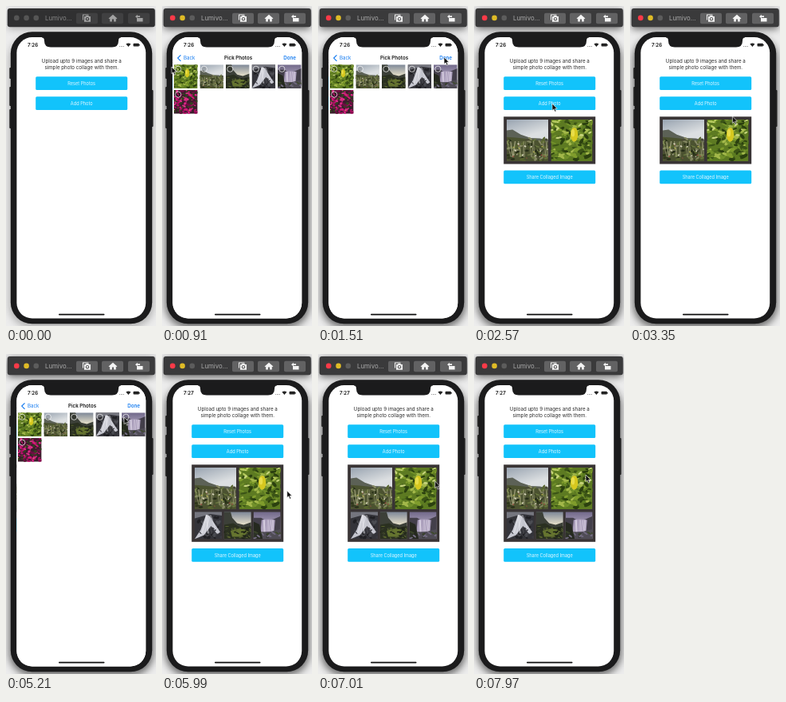
An HTML page for the animation above (8 s loop, 188x400 px).

```html
<!DOCTYPE html>
<html lang="en">
<head>
<meta charset="utf-8">
<title>Photo collage demo</title>
<style>
html, body { margin: 0; width: 100%; height: 100%; overflow: hidden; background: #ececec; }
svg#stage { display: block; width: 100vw; height: 100vh; }
text { font-family: Inter, "Liberation Sans", sans-serif; }
.mid { text-anchor: middle; }
.copy { font-size: 6.2px; fill: #2a2a2a; }
.label { font-size: 5.6px; fill: #e6f8ff; text-anchor: middle; }
.nav { font-size: 6.2px; fill: #147bf0; }
.bold { font-weight: 600; }
.lights circle { fill: #555; }
.key { fill: #404041; }
.icon { fill: #a2a2a2; }
.name { font-size: 7.8px; fill: #858585; }
.active .lights circle:nth-child(1) { fill: #fb3a48; }
.active .lights circle:nth-child(2) { fill: #dfbb26; }
.active .lights circle:nth-child(3) { fill: #5c5c5c; }
.active .key { fill: #626263; }
.active .icon { fill: #f4f4f4; }
.active .name { fill: #a8a8a8; }
.active .bar { fill: #3a3a3b; }
.active .shade { opacity: .55; }
.bar { fill: #303031; }
.shade { opacity: .25; }
</style>
</head>
<body>
<svg id="stage" viewBox="0 0 188 400" preserveAspectRatio="none">
  <defs>
    <clipPath id="screen"><rect x="13.4" y="39" width="161.8" height="351.6" rx="19.5"/></clipPath>
    <filter id="soft" x="-20%" y="-20%" width="140%" height="140%"><feGaussianBlur stdDeviation="5"/></filter>
    <linearGradient id="sky" x2=".3" y2="1"><stop stop-color="#98a3b0"/><stop offset=".5" stop-color="#dcdfe1"/></linearGradient>
    <linearGradient id="dusk" x2="0" y2="1"><stop stop-color="#7d8797"/><stop offset=".5" stop-color="#ece5cc"/></linearGradient>
    <linearGradient id="mauve" x2="0" y2="1"><stop stop-color="#71698a"/><stop offset=".6" stop-color="#b9aec6"/></linearGradient>
    <g id="photos"></g>
  </defs>

  <g id="window">
    <g class="shade" filter="url(#soft)">
      <rect x="2" y="5" width="184" height="24" rx="4"/>
      <rect x="4" y="38" width="181" height="364" rx="28"/>
    </g>
    <rect class="bar" x="1.8" y="3" width="185" height="23.3" rx="3"/>
    <g class="lights"><circle cx="13.3" cy="14.9" r="3.3"/><circle cx="25.6" cy="14.9" r="3.3"/><circle cx="37.8" cy="14.9" r="3.3"/></g>
    <text class="name" x="49" y="17.8">Lumivo...</text>
    <g class="key">
      <rect x="88" y="8.7" width="27" height="13.5" rx="2"/>
      <rect x="120" y="8.7" width="27" height="13.5" rx="2"/>
      <rect x="153" y="8.7" width="27" height="13.5" rx="2"/>
    </g>
    <g class="icon">
      <path d="M96 10.6h7.5v1h-6.5v6h-1z"/>
      <path d="M98 13h1.8l.9-1.1h2.6l.9 1.1h1.8v6.8h-8z"/>
      <path d="M128.6 15.4l5.4-4.7 5.4 4.7-.8.8-.8-.6v3.9h-2.7v-2.9h-2.2v2.9h-2.7v-3.9l-.8.6z"/>
      <path d="M164 15h7.5v4.6h-7.5zM162 13.2l2.8-2.4v1.5h3.2v1.7h-3.2v1.5z"/>
    </g>
    <circle class="key" cx="102" cy="16.2" r="2.2"/>
    <circle class="icon" cx="102" cy="16.2" r="1.1"/>
  </g>

  <g fill="#222">
    <rect x="4.3" y="77" width="3" height="14" rx="1"/>
    <rect x="4.3" y="101" width="3" height="24" rx="1"/>
    <rect x="4.3" y="129" width="3" height="24" rx="1"/>
    <rect x="182" y="105" width="2.5" height="46" rx="1"/>
  </g>
  <rect x="5.8" y="32.3" width="177.4" height="365" rx="27" fill="#1b1b1c"/>

  <g clip-path="url(#screen)">
    <rect x="13" y="38" width="163" height="354" fill="#fff"/>
    <g id="home">
      <text class="copy mid" x="94.8" y="71">Upload upto 9 images and share a</text>
      <text class="copy mid" x="94.8" y="78.9">simple photo collage with them.</text>
      <g id="buttons"></g>
      <g id="pair"></g>
      <g id="five"></g>
    </g>
    <g id="picker">
      <rect x="13" y="38" width="163" height="354" fill="#fff"/>
      <path d="M23.5 61.3l-3.7 3.8 3.7 3.8" fill="none" stroke="#147bf0" stroke-width="1.2"/>
      <text class="nav" x="27" y="67.4">Back</text>
      <text class="nav bold mid" x="95.5" y="67.4" style="fill:#111">Pick Photos</text>
      <text class="nav bold" x="168" y="67.4" text-anchor="end">Done</text>
      <g id="grid"></g>
    </g>
    <path d="M45 38v1.5q3 0 3 4 0 8 8 8h77q8 0 8-8 0-4 3-4V38z" fill="#1b1b1c"/>
    <text id="clock" class="bold" x="27" y="51" font-size="6.2" fill="#111">7:26</text>
    <g fill="#222">
      <circle cx="142.5" cy="50.5" r=".4"/><circle cx="144.2" cy="50.5" r=".4"/><circle cx="145.9" cy="50.5" r=".4"/><circle cx="147.6" cy="50.5" r=".4"/>
      <path d="M150.4 47.6q3-2.4 6 0l-3 3.3z"/>
      <rect x="159.5" y="46.8" width="7.4" height="3.8" rx="1"/><rect x="167.3" y="48" width=".7" height="1.5"/>
    </g>
    <rect x="66" y="384.8" width="57.5" height="1.7" rx=".8" fill="#111"/>
  </g>
  <path id="cursor" d="M0 0v8.6l2-1.8 1.5 3.4 1.5-.7-1.5-3.2h2.7z" fill="#111" stroke="#fff" stroke-width=".6"/>
</svg>

<script>
const LOOP = 8000;
const $ = id => document.getElementById(id);

// Photos, each drawn in a 100 x 100 box
let seed = 7;
const rnd = (a = 0, b = 1) => {
  seed = (seed * 16807) % 2147483647;
  return a + (b - a) * seed / 2147483647;
};
const pick = list => list[Math.floor(rnd(0, list.length))];
const rect = fill => `<rect width="100" height="100" fill="${fill}"/>`;
const path = (d, fill) => `<path d="${d}" fill="${fill}"/>`;
const many = (n, make) => Array.from({ length: n }, make).join('');
const blobs = (n, colors, y0, y1, rx, ry) => many(n, () => {
  const x = rnd(0, 100).toFixed(1), y = rnd(y0, y1).toFixed(1);
  return `<ellipse cx="${x}" cy="${y}" rx="${rnd(rx / 2, rx).toFixed(1)}" ry="${rnd(ry / 2, ry).toFixed(1)}"
    fill="${pick(colors)}" transform="rotate(${rnd(-60, 60).toFixed(0)} ${x} ${y})"/>`;
});
const strands = (n, color, x0, x1, y0, y1, lean) => many(n, () => {
  const x = rnd(x0, x1).toFixed(1);
  return `<path d="M${x} ${y0}l${rnd(-lean, lean).toFixed(1)} ${y1 - y0}" stroke="${color}"
    stroke-width="${rnd(.8, 2).toFixed(1)}" opacity=".6"/>`;
});

const photos = {
  lemon: () => rect('#5d7a22') +
    blobs(130, ['#7f9c2c', '#3b5416', '#a3b84a', '#5b7c20', '#2b400f', '#71902a'], 0, 100, 10, 4) +
    blobs(14, ['#c8d67e', '#b4c95c'], 0, 45, 8, 3) +
    '<ellipse cx="56" cy="36" rx="9" ry="17" fill="#d6c81f"/><ellipse cx="53" cy="32" rx="4" ry="9" fill="#e9de4a"/>',
  field: () => rect('url(#sky)') +
    path('M0 26L14 24 34 36 58 44 80 45 100 50V70H0z', '#5c6156') +
    path('M0 42Q40 44 100 54V100H0z', '#4b5230') +
    blobs(80, ['#697640', '#2f371c', '#858863', '#262d18', '#58652f', '#4a4a35'], 46, 100, 8, 3) +
    strands(22, '#a9a984', 0, 100, 52, 90, 9) +
    blobs(20, ['#d9d6bd', '#c3b552', '#8f5140'], 58, 98, 3, 2),
  hills: () => rect('url(#dusk)') +
    path('M0 0H24L30 22 48 42 72 48 100 38V100H0z', '#3c4038') +
    path('M0 48L34 42 62 58 100 52V100H0z', '#2a3020') +
    path('M24 70Q60 52 92 72L70 92H30z', '#65742f') +
    blobs(40, ['#1d2116', '#59642f', '#363c2b'], 52, 100, 8, 3),
  falls: () => rect('#34343a') +
    path('M0 0H100V14L58 8 0 24z', '#75767f') +
    blobs(40, ['#202024', '#4b4c52', '#3a3a40'], 16, 100, 10, 6) +
    path('M42 10Q58 12 64 30L94 74 84 82 60 52 34 86 0 100 22 66z', '#c4c5ce') +
    strands(14, '#f1f1f6', 40, 60, 12, 80, 28) +
    blobs(9, ['#3c3c42'], 30, 90, 7, 3),
  cascade: () => rect('url(#mauve)') +
    path('M0 22H28L46 32 72 28 100 16V76H0z', '#433f4a') +
    path('M30 30Q50 24 80 30L76 74H26z', '#a79bb8') +
    strands(18, '#eee8f5', 32, 74, 30, 74, 8) +
    path('M0 72Q50 80 100 64V100H0z', '#4f4c55') +
    path('M0 36L22 46 34 100H0z', '#25291f') +
    blobs(18, ['#3e4a2b', '#716a80', '#2f332a'], 74, 100, 10, 4),
  petals: () => rect('#3a1e2c') +
    blobs(110, ['#d31678', '#b00e66', '#dd2c88', '#31451f', '#6f0d43'], 0, 100, 9, 5) +
    blobs(9, ['#c99a4a'], 10, 95, 2.5, 2.5)
};
$('photos').innerHTML = Object.entries(photos).map(([id, draw]) =>
  `<symbol id="${id}" viewBox="0 0 100 100">${draw()}</symbol>`).join('');

// Interface parts
const photo = (id, x, y, size) => `<use href="#${id}" x="${x}" y="${y}" width="${size}" height="${size}"/>`;
const button = (label, y) => `<rect x="37.2" y="${y}" width="115" height="16.8" rx="1.6" fill="#12c3fb"/>
  <text class="label" x="94.7" y="${y + 10.5}">${label}</text>`;
const frame = h => `<rect x="37.2" y="138.3" width="115" height="${h}" fill="#393435"/>` +
  photo('field', 41, 142, 52) + photo('lemon', 96.5, 142, 52);

$('buttons').innerHTML = button('Reset Photos', 88.2) + button('Add Photo', 113.2);
$('pair').innerHTML = frame(59.2) + button('Share Collaged Image', 205.5);
$('five').innerHTML = frame(96.5) +
  ['falls', 'hills', 'cascade'].map((id, i) => photo(id, 41 + i * 36.8, 197.3, 34)).join('') +
  button('Share Collaged Image', 243);
$('grid').innerHTML = ['lemon', 'field', 'hills', 'falls', 'cascade', 'petals'].map((id, i) => {
  const x = 15 + (i % 5) * 32.5, y = 73.3 + Math.floor(i / 5) * 31.8;
  return photo(id, x, y, 29.6) +
    `<circle cx="${x + 5.3}" cy="${y + 5.5}" r="3.6" fill="#0002" stroke="#fff" stroke-width=".7"/>`;
}).join('');

// Motion: [time, values...]
const pointer = [
  [250, 97, 121], [430, 97, 121], [850, 12, 76], [940, 12, 76],
  [1090, 28, 87], [1180, 28, 87], [1270, 60, 87], [1340, 60, 87],
  [1480, 158, 64], [1570, 158, 64], [1870, 98, 122], [2630, 98, 122],
  [3300, 128, 138], [3900, 147, 132], [4130, 147, 132], [4330, 98, 121],
  [4480, 98, 121], [4720, 123, 86], [4800, 123, 86], [4920, 92, 86],
  [5000, 92, 86], [5150, 148, 79], [5290, 148, 79], [5400, 158, 64],
  [5500, 158, 64], [5840, 156.7, 171], [6300, 156.7, 171], [7550, 140, 151], [8000, 140, 151]
];
const slide = [[430, 0], [730, 1], [1530, 1], [1800, 0], [4440, 0], [4740, 1], [5440, 1], [5740, 0]];

const ease = p => p * p * (3 - 2 * p);
function sample(steps, t) {
  const i = steps.findIndex(s => s[0] > t);
  if (i < 0) return steps[steps.length - 1].slice(1);
  if (i === 0) return steps[0].slice(1);
  const a = steps[i - 1], b = steps[i];
  const p = ease((t - a[0]) / (b[0] - a[0]));
  return a.slice(1).map((v, k) => v + (b[k + 1] - v) * p);
}
const show = (id, on) => $(id).setAttribute('visibility', on ? 'visible' : 'hidden');
const move = (id, x, y = 0) => $(id).setAttribute('transform', `translate(${x} ${y})`);

function render(t) {
  const [open] = sample(slide, t);
  move('picker', 163 * (1 - open));
  move('home', -50 * open);
  show('picker', open > 0);
  show('pair', t >= 1930 && t < 5790);
  show('five', t >= 5790);
  show('cursor', t >= 250);
  move('cursor', ...sample(pointer, t));
  $('window').setAttribute('class', t >= 250 ? 'active' : '');
  $('clock').textContent = t < 5600 ? '7:26' : '7:27';
}

const start = performance.now();
function tick() {
  render((performance.now() - start) % LOOP);
  requestAnimationFrame(tick);
}
tick();
</script>
</body>
</html>
```
